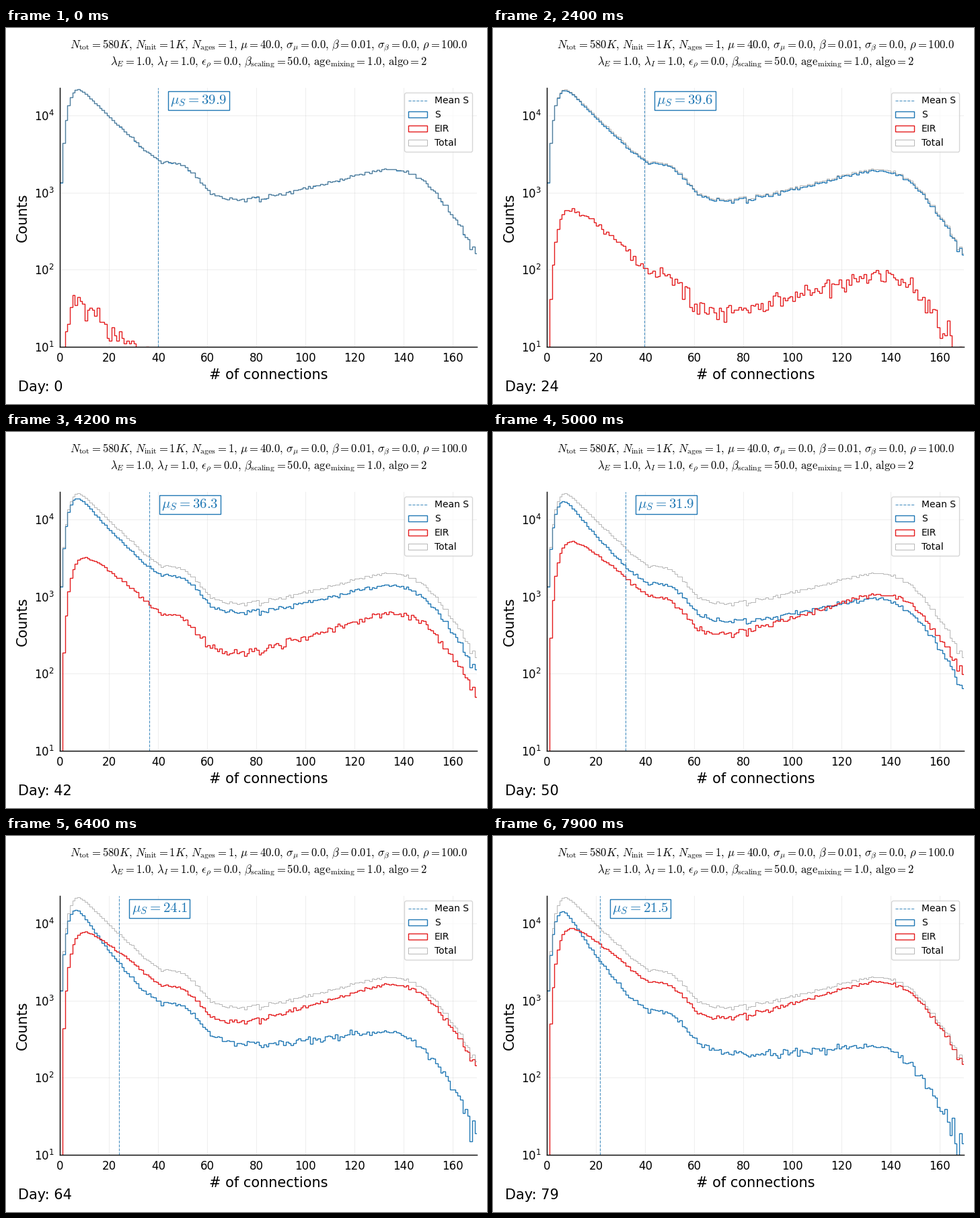
A matplotlib script for the animation above (8000 ms loop, 715x559 px).

```python
import numpy as np
import matplotlib.pyplot as plt
from matplotlib.animation import FuncAnimation
from matplotlib.lines import Line2D
from matplotlib.patches import Patch

W, H, DPI = 715, 559, 100
DAYS, INTERVAL = 80, 100
BLUE, RED, GRAY = "#1f77b4", "#e41a1c", "#808080"

plt.rcParams.update({
    "font.family": "DejaVu Sans",
    "mathtext.fontset": "cm",
    "axes.linewidth": 1.0,
})

rng = np.random.default_rng(7)
x = np.arange(170)
edges = np.arange(171)


def logistic(z):
    return 1 / (1 + np.exp(-z))


def bell(center, width):
    return np.exp(-.5 * ((x - center) / width) ** 2)


def degree_counts():
    """Number of people for each number of connections."""
    low = 40000 * np.exp(-.0732 * x) * (1 - np.exp(-.031 - .05 * x - .04 * x ** 2))
    middle = 820 * bell(49, 5.5)
    high = 1920 * np.exp(.0215 * (x - 125)) * logistic(.145 * (146.2 - x))
    return rng.poisson(low + middle + high)


def exposure(day):
    """Accumulated infection hazard for each number of connections."""
    limit = (.5 + .0125 * x) * (1 - np.exp(-x / 7)) + .35 * bell(30, 15) * (x > 0)
    rate = .112 + .0001 * x
    halfway = 55 - 7.5 * np.exp(-x / 30)
    return limit * logistic(rate * (day - halfway))


def epidemic(total):
    """Infected people per bin, one row per day."""
    rows = [rng.poisson(total * .0017)]
    for day in range(1, DAYS):
        p = 1 - np.exp(exposure(day - 1) - exposure(day))
        rows.append(rows[-1] + rng.binomial(total - rows[-1], p))
    return np.array(rows)


def mean_degree(day):
    return 39.955 - 18.9 * logistic(.14 * (day - 52.2))


total = degree_counts()
infected = epidemic(total)

fig = plt.figure(figsize=(W / DPI, H / DPI), dpi=DPI, facecolor="white")
ax = fig.add_axes([80.4 / W, 85 / H, 620 / W, 385 / H])
ax.set_yscale("log")
ax.set_xlim(0, 170)
ax.set_ylim(10, 10 ** (1 + 385 / 114.6))
ax.set_xlabel("# of connections", fontsize=15)
ax.set_ylabel("Counts", fontsize=15, labelpad=5)
ax.minorticks_off()
ax.tick_params(length=0, pad=6, labelsize=12)
ax.grid(color="#b0b0b0", alpha=.2, linewidth=.8)
ax.set_axisbelow(True)
ax.spines[["top", "right"]].set_visible(False)


def join(*parts):
    return "$" + r", \, ".join(parts) + "$"


title = "\n".join([
    join(r"N_\mathrm{tot} = 580K", r"N_\mathrm{init} = 1K",
         r"N_\mathrm{ages} = 1", r"\mu = 40.0", r"\sigma_\mu = 0.0",
         r"\beta = 0.01", r"\sigma_\beta = 0.0", r"\rho = 100.0"),
    join(r"\lambda_E = 1.0", r"\lambda_I = 1.0", r"\epsilon_\rho = 0.0",
         r"\beta_\mathrm{scaling} = 50.0",
         r"\mathrm{age}_\mathrm{mixing} = 1.0", r"\mathrm{algo} = 2"),
])
fig.text(391 / W, 1 - 55 / H, title, fontsize=12, ha="center", va="baseline")


def steps(color, width, z, alpha=1):
    return ax.stairs(total, edges, baseline=None, color=color,
                     linewidth=width, alpha=alpha, zorder=z)


s_steps = steps(BLUE, 1, 2)
eir_steps = steps(RED, 1, 2.1)
steps(GRAY, .5, 2.2, .8)

dashes = dict(color=BLUE, linestyle="--", linewidth=.8, alpha=.8)
mean_line = ax.axvline(40, zorder=2.3, **dashes)
mean_text = ax.text(45, .95, "", color=BLUE, fontsize=15, va="center",
                    transform=ax.get_xaxis_transform(), zorder=4,
                    bbox=dict(boxstyle="square,pad=0.15", facecolor="white",
                              edgecolor=BLUE, linewidth=1))
day_text = fig.text(18 / W, 1 - 540 / H, "", fontsize=15, va="baseline")


def box(color, width, label, alpha=1):
    return Patch(fill=False, edgecolor=color, linewidth=width, label=label,
                 alpha=alpha)


ax.legend(handles=[Line2D([], [], label="Mean S", **dashes),
                   box(BLUE, 1, "S"), box(RED, 1, "EIR"),
                   box(GRAY, .5, "Total", .8)],
          loc="upper right", fontsize=10)


def update(day):
    sick = infected[day]
    s_steps.set_data(values=np.maximum(total - sick, .5))
    eir_steps.set_data(values=np.maximum(sick, .5))
    mean = mean_degree(day)
    mean_line.set_xdata([mean, mean])
    mean_text.set_x(mean + 5)
    mean_text.set_text(rf"$\mu_S = {mean:.1f}$")
    day_text.set_text(f"Day: {day}")
    return s_steps, eir_steps, mean_line, mean_text, day_text


anim = FuncAnimation(fig, update, frames=DAYS, interval=INTERVAL,
                     repeat=True, repeat_delay=0, blit=False)
plt.show()
```
